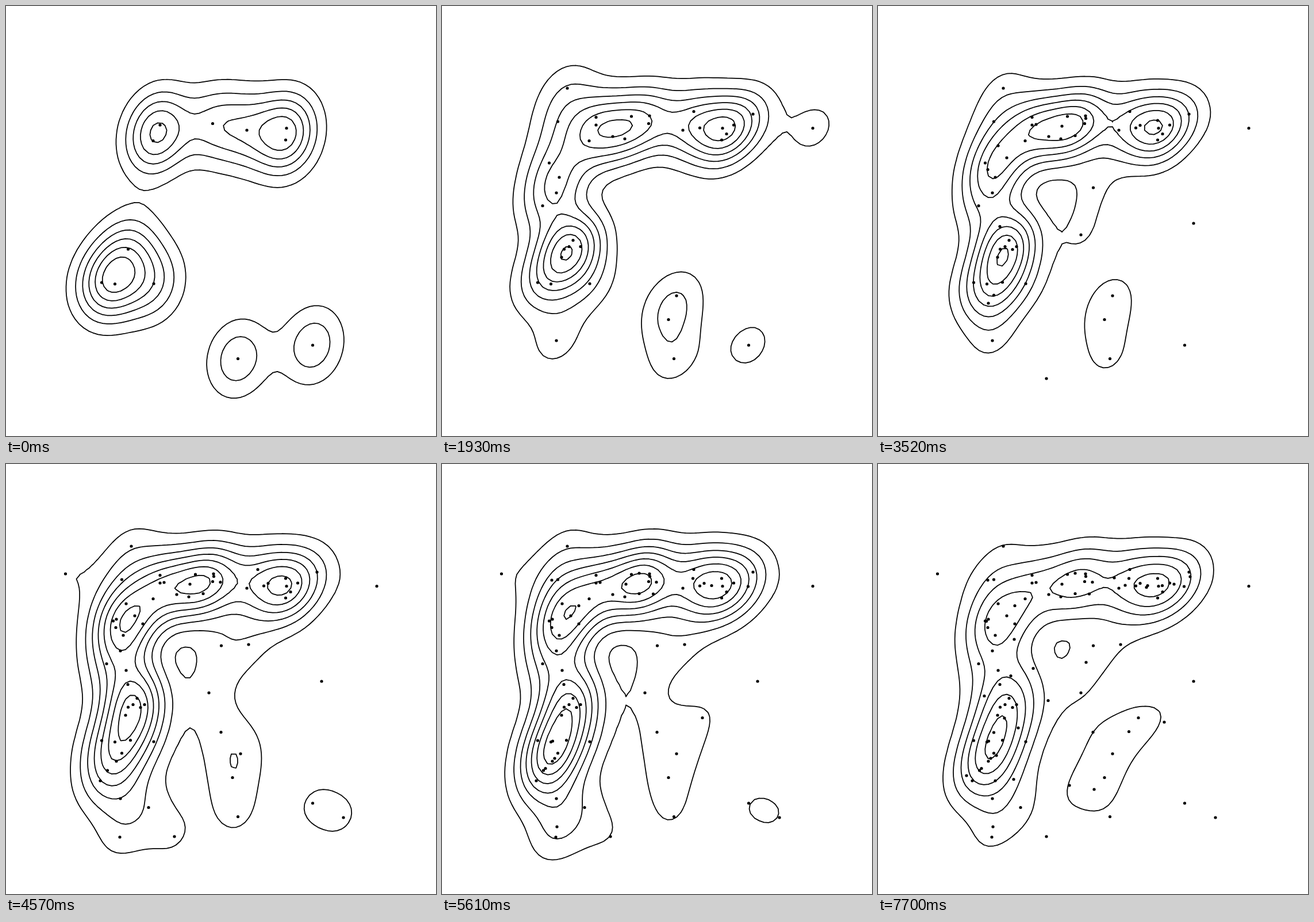
Animation of 748 by 748 pixels, one loop 8000 ms. Source, as an HTML page with a canvas:

```html
<!DOCTYPE html>
<html lang="en">
<head>
<meta charset="utf-8">
<title>Density contours of a growing sample</title>
<style>
  html, body { margin: 0; width: 100%; height: 100%; overflow: hidden; background: #fff; }
  canvas { display: block; }
</style>
</head>
<body>
<canvas id="plot" width="748" height="748"></canvas>
<script>
const ctx = document.getElementById('plot').getContext('2d');
const LOOP = 8000;
const BANDWIDTH = 0.3;   // kernel size relative to the sample's spread
const UNIT = 5.28e-7;    // density unit of the contour levels, per square pixel
const CELL = 8, CELLS = 94;

// Each stage adds points to the sample and sets the spacing of its levels.
const stages = [];
let sample = [];
function stage(start, spacing, ...coords) {
  const fresh = [];
  for (let i = 0; i < coords.length; i += 2) fresh.push([coords[i], coords[i + 1]]);
  sample = sample.concat(fresh);
  stages.push({ start, level: spacing * UNIT, points: sample });
}

stage(0, 5, 268, 207, 256, 234.5, 359.5, 204.5, 419, 216, 488, 212.5, 486.5, 233,
  212.5, 423, 166.5, 481, 189.5, 483.5, 257, 483, 403.5, 613.5, 533.5, 590);
stage(420, 5, 218, 143, 541, 188, 268, 193.5, 199, 325, 495, 222.5, 228, 407.5);
stage(940, 5, 201.5, 201, 318, 231, 438, 183.5, 448.5, 212, 221, 418.5, 199, 582);
stage(1460, 4, 394, 545.5, 507.5, 207, 361, 191, 204, 298, 208, 437, 186.5, 273);
stage(1930, 4, 645, 212.5, 297, 227, 241, 418.5, 408, 504, 329.5, 192, 175, 347.5);
stage(2460, 4, 293, 648, 549, 378, 320, 209, 361.5, 195.5, 209, 243, 192, 517);
stage(2980, 4, 275, 206, 456, 207.5, 224, 264, 212, 383.5, 216.5, 480.5, 374.5, 316);
stage(3520, 4, 343, 225.5, 191, 284.5, 234, 423.5, 201.5, 503, 353, 398, 486.5, 199);
stage(4040, 3, 103.5, 191, 587, 615, 198, 649, 373, 205.5, 238, 278, 176.5, 533);
stage(4570, 3, 192, 270, 209, 359, 422, 314, 374, 466.5, 164, 551, 248, 597.5);
stage(5100, 3, 191, 202, 343, 190, 436.5, 199, 192.5, 482, 453, 441.5, 238, 246.5);
stage(5610, 3, 200, 631, 367.5, 226, 469, 211.5, 532.5, 213, 196, 512, 180, 529.5);
stage(6130, 3, 430, 211, 494.5, 211.5, 237, 305, 270, 355.5, 206, 507, 376, 566);
stage(6660, 3, 467, 214.5, 515, 209, 296, 411.5, 154, 542, 236, 548.5, 333, 559);
stage(7180, 3, 411, 198, 188.5, 273.5, 231, 368.5, 220, 442, 436.5, 465.5, 204, 551);
stage(7700, 4, 543, 196, 362, 345, 185, 403.5, 244, 459, 201.5, 467, 498, 449);

// Gaussian kernel density with the kernel shaped by the sample covariance.
function densityOf(points) {
  const n = points.length;
  const mean = k => points.reduce((sum, p) => sum + p[k], 0) / n;
  const center = [mean(0), mean(1)];
  const cov = (i, j) => BANDWIDTH ** 2 / (n - 1) *
    points.reduce((sum, p) => sum + (p[i] - center[i]) * (p[j] - center[j]), 0);
  const xx = cov(0, 0), xy = cov(0, 1), yy = cov(1, 1);
  const det = xx * yy - xy * xy;
  const scale = 1 / (2 * Math.PI * n * Math.sqrt(det));
  return (x, y) => {
    let sum = 0;
    for (const [px, py] of points) {
      const dx = x - px, dy = y - py;
      sum += Math.exp((2 * xy * dx * dy - yy * dx * dx - xx * dy * dy) / (2 * det));
    }
    return scale * sum;
  };
}

function gridOf(density) {
  const rows = [];
  for (let j = 0; j <= CELLS; j++) {
    const row = [];
    for (let i = 0; i <= CELLS; i++) row.push(density(i * CELL, j * CELL));
    rows.push(row);
  }
  return rows;
}

// Marching squares: adds the level's line within one cell to the path.
const CORNERS = [[0, 0], [1, 0], [1, 1], [0, 1]];
function traceCell(path, i, j, z, level) {
  const hits = [];
  for (let a = 0; a < 4; a++) {
    const b = (a + 1) % 4;
    if ((z[a] > level) === (z[b] > level)) continue;
    const f = (level - z[a]) / (z[b] - z[a]);
    const at = k => CORNERS[a][k] + f * (CORNERS[b][k] - CORNERS[a][k]);
    hits.push([(i + at(0)) * CELL, (j + at(1)) * CELL]);
  }
  if (hits.length === 4) {
    const middle = (z[0] + z[1] + z[2] + z[3]) / 4;
    if ((middle > level) !== (z[0] > level)) hits.unshift(hits.pop());
  }
  for (let k = 0; k < hits.length; k += 2) {
    path.moveTo(...hits[k]);
    path.lineTo(...hits[k + 1]);
  }
}

function contoursOf({ points, level }) {
  const grid = gridOf(densityOf(points));
  const path = new Path2D();
  for (let j = 0; j < CELLS; j++) {
    for (let i = 0; i < CELLS; i++) {
      const z = CORNERS.map(([x, y]) => grid[j + y][i + x]);
      const top = Math.max(...z);
      const first = Math.max(1, Math.ceil(Math.min(...z) / level));
      for (let k = first; k * level < top; k++) traceCell(path, i, j, z, k * level);
    }
  }
  return path;
}

function draw(current) {
  current.contours = current.contours || contoursOf(current);
  ctx.fillStyle = '#fff';
  ctx.fillRect(0, 0, 748, 748);
  ctx.strokeStyle = ctx.fillStyle = '#000';
  ctx.lineWidth = 1.75;
  ctx.lineCap = 'round';
  ctx.stroke(current.contours);
  ctx.beginPath();
  for (const [x, y] of current.points) {
    ctx.moveTo(x + 2.6, y);
    ctx.arc(x, y, 2.6, 0, 2 * Math.PI);
  }
  ctx.fill();
}

let shown;
function tick() {
  const time = performance.now() % LOOP;
  const current = stages.filter(s => s.start <= time).pop();
  if (current !== shown) draw(shown = current);
  requestAnimationFrame(tick);
}
tick();
</script>
</body>
</html>
```
